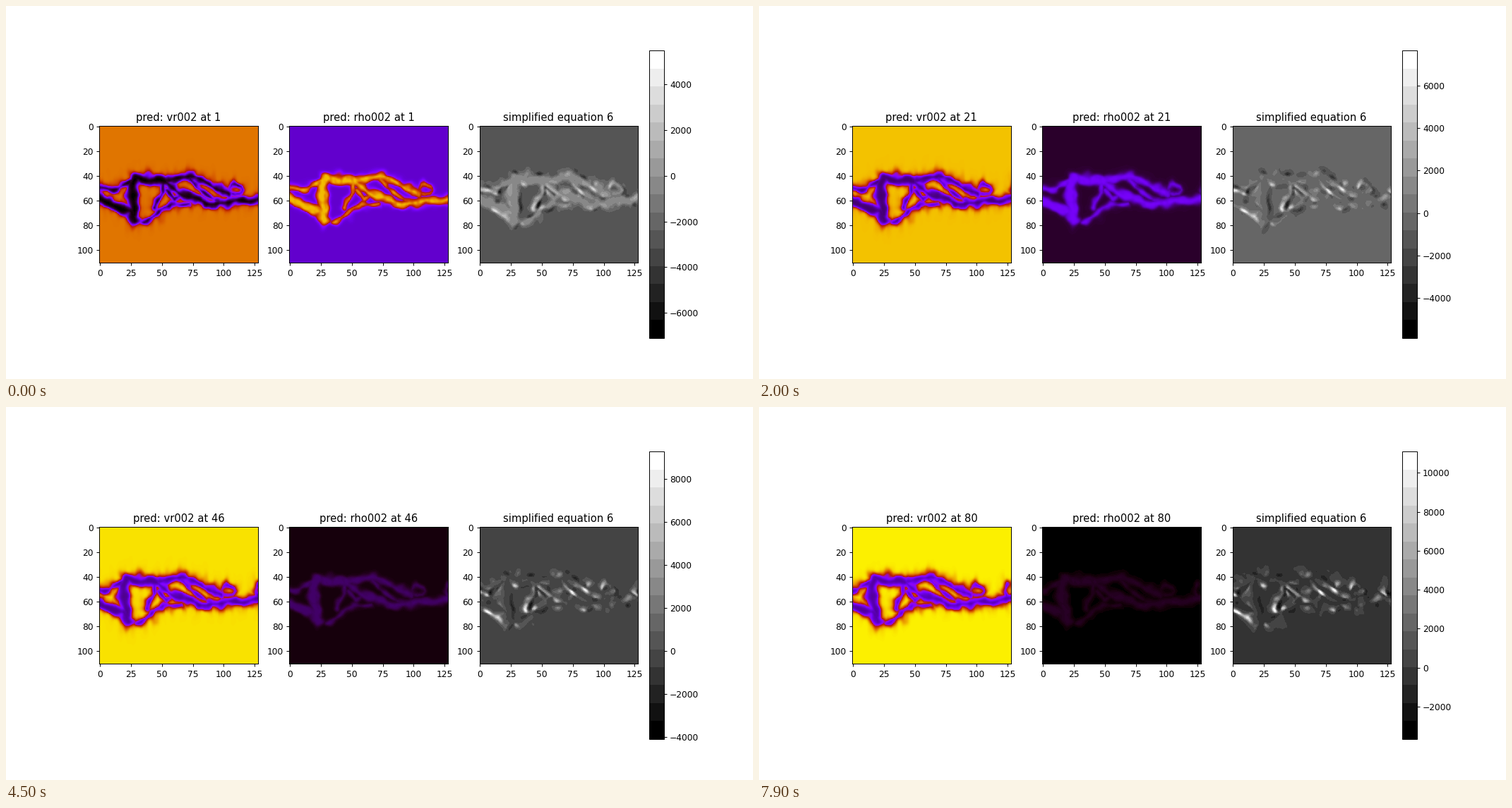
Recreate the animation shown at these times as a matplotlib script. Size 1058 by 529 pixels, loop 8 s.

```python
import numpy as np
import matplotlib.pyplot as plt
from matplotlib.animation import FuncAnimation

W, H, FRAMES = 128, 111, 80

# Colour bar limits at a few steps
KEYS = [1, 14, 28, 39, 53, 66, 80]
LOWS = [-7100, -6890, -4893, -4435, -3766, -3358, -3667]
HIGHS = [5480, 7186, 8105, 9198, 9310, 10468, 11078]

# Filaments: half-width, then key points in grid units
STROKES = [
    (4.4, [(-4, 58), (12, 64), (24, 69), (29, 77)]),
    (2.5, [(-4, 51), (14, 50), (27, 45)]),
    (4.6, [(29, 44), (26, 58), (27, 72)]),
    (4.2, [(29, 42), (40, 43), (52, 45)]),
    (3.1, [(52, 45), (72, 40), (88, 46), (104, 55)]),
    (3.2, [(52, 45), (64, 53), (85, 63), (104, 62), (140, 58)]),
    (2.1, [(50, 45), (51, 54), (44, 65)]),
    (1.5, [(36, 78), (50, 69), (58, 64), (72, 62)]),
    (1.5, [(72, 42), (78, 51), (96, 61)]),
    (1.5, [(54, 52), (60, 60), (66, 54)]),
    (2.0, [(134, 58), (133, 48)]),
]
turn = np.linspace(0, 2 * np.pi, 9)
STROKES.append((1.3, list(zip(109.5 + 4.5 * np.cos(turn), 52 + 4.5 * np.sin(turn)))))

rng = np.random.default_rng(6)
yy, xx = np.mgrid[0:H, 0:W].astype(np.float32)


def make_noise(length, stretch=1.0, count=9):
    """Smooth noise from random plane waves, about unit variance."""
    angle = rng.uniform(0, 2 * np.pi, count)
    k = 2 * np.pi / (length * rng.uniform(.65, 1.5, count))
    kx, ky = k * np.cos(angle), k * np.sin(angle) / stretch
    phase = rng.uniform(0, 2 * np.pi, count)

    def noise(x, y):
        total = sum(np.sin(a * x + b * y + p) for a, b, p in zip(kx, ky, phase))
        return total * np.sqrt(2 / count)
    return noise


warp_x, warp_y = make_noise(18), make_noise(18)
rough, grain = make_noise(9), make_noise(6)
feather = make_noise(6, 3)
swing, patch = make_noise(28), make_noise(13)


def sigmoid(v):
    return 1 / (1 + np.exp(-np.clip(v, -30, 30)))


def mix(a, b, t):
    return a + (b - a) * t


def edge_distance(x, y):
    """Signed distance to the nearest filament edge, negative inside."""
    best = np.full(x.shape, 99, np.float32)
    for radius, points in STROKES:
        for (ax, ay), (bx, by) in zip(points, points[1:]):
            dx, dy = bx - ax, by - ay
            t = np.clip(((x - ax) * dx + (y - ay) * dy) / (dx * dx + dy * dy), 0, 1)
            d = np.hypot(x - ax - t * dx, y - ay - t * dy) - radius
            np.minimum(best, d, out=best)
    return best


def fields(step):
    u = (step - 1) / (FRAMES - 1)
    fade = 1 / (1 + (step - 1) / 30)
    drift = 10.5 * u ** .75
    x = xx + drift * (1.08 - .25 * xx / W) * (1 - .3 * sigmoid((yy - 67) / 3))
    y = yy
    s = edge_distance(x + .7 * warp_x(x, y), y + .7 * warp_y(x, y))
    s = s + .5 * rough(x, y) + .1 * grain(x, y) - .2

    body = sigmoid(-s / (.85 + .2 * u))
    wisp = np.clip(.5 + .6 * feather(x, y), 0, 1.5)
    haze = .24 * wisp * np.exp(-np.maximum(s, 0) / 2.2) * (1 - body)
    cover = np.clip(body + haze, 0, 1)
    vr = mix(1 - .229 * fade ** 1.84, .11 * (1 - fade ** 2), cover)

    dense = sigmoid(-(s + .7) / .85) * np.clip(.95 + .06 * grain(x, y), 0, 1)
    dense = np.clip(dense + .07 * body, 0, 1)
    rho = mix(.15 * fade ** 3.1, .9 * fade ** 2.8, dense)

    low, high = np.interp(step, KEYS, LOWS), np.interp(step, KEYS, HIGHS)
    gy, gx = np.gradient(body)
    angle = .8 * swing(x, y)
    slope = gx * np.cos(angle) + gy * np.sin(angle)
    slope = slope * np.clip(.5 + .45 * patch(x, y), .08, 1.2)
    slope = slope / np.percentile(np.abs(slope), 99.7)
    base = -2600 * np.exp(-(step - 1) / 16) * (1 - .95 * cover)
    eq = base + np.where(slope > 0, mix(.65, .8, u) * high, -.5 * low) * slope
    return vr, rho, np.clip(eq, low, high), low, high


fig, axes = plt.subplots(1, 3, figsize=(12, 6), dpi=88.167)
blank = np.zeros((H, W))
vr_im = axes[0].imshow(blank, cmap='gnuplot', vmin=0, vmax=1)
rho_im = axes[1].imshow(blank, cmap='gnuplot', vmin=0, vmax=1)
eq_im = axes[2].imshow(blank, cmap=plt.get_cmap('gray', 16),
                       vmin=LOWS[0], vmax=HIGHS[0])
axes[2].set_title('simplified equation 6')
fig.colorbar(eq_im, ax=axes.tolist(), fraction=.05, pad=.02)


def draw(i):
    step = i + 1
    vr, rho, eq, low, high = fields(step)
    vr_im.set_data(vr)
    rho_im.set_data(rho)
    eq_im.set_data(eq)
    eq_im.set_clim(low, high)
    axes[0].set_title(f'pred: vr002 at {step}')
    axes[1].set_title(f'pred: rho002 at {step}')
    return vr_im, rho_im, eq_im


anim = FuncAnimation(fig, draw, frames=FRAMES, interval=100,
                     repeat=True, repeat_delay=0, blit=False)
plt.show()
```
